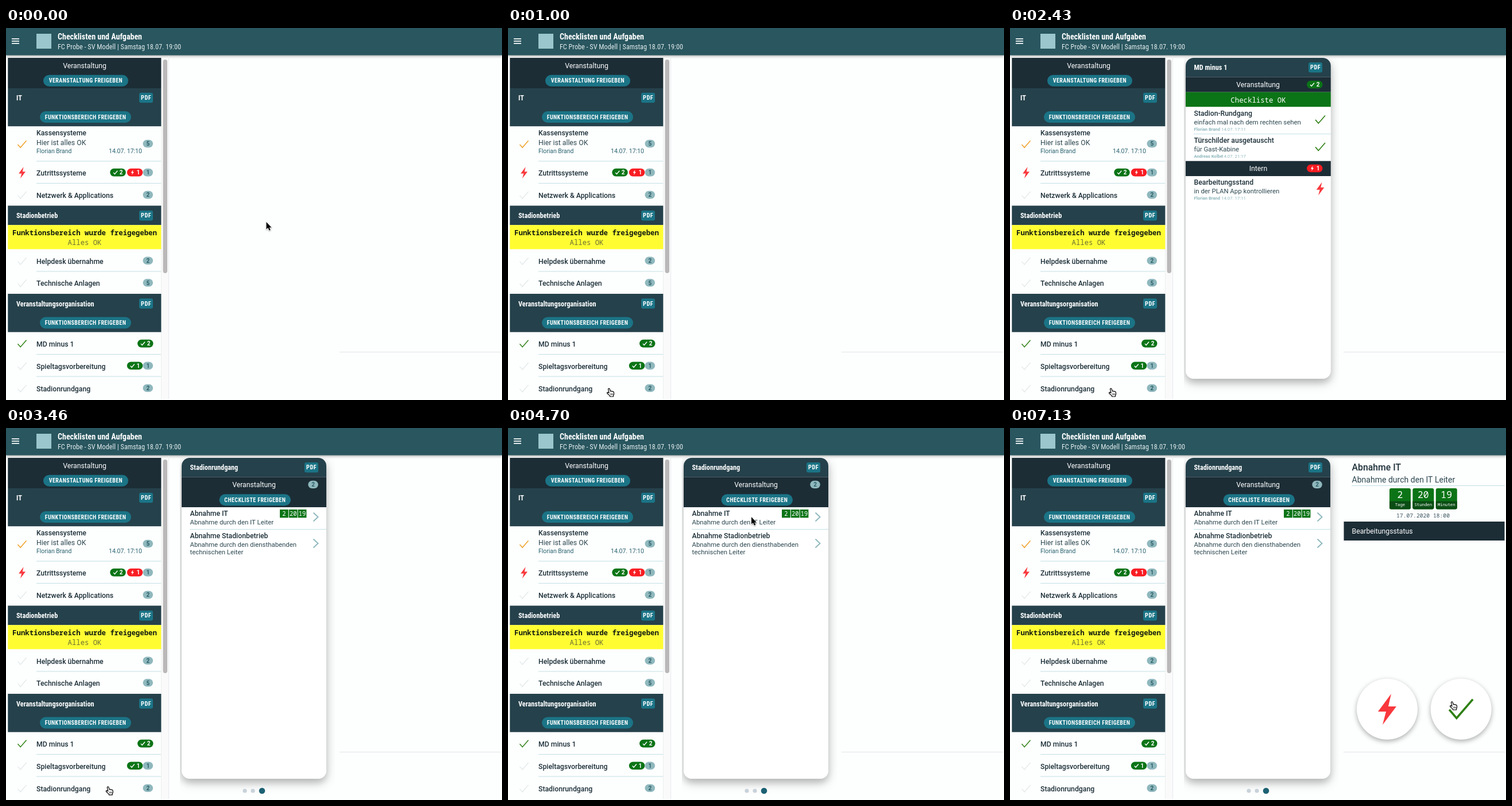
Recreate the animation shown at these times as an HTML page with a canvas. Size 864 by 648 pixels, loop 8000 ms.

```html
<!DOCTYPE html>
<html lang="de">
<head>
<meta charset="utf-8">
<title>Checklisten und Aufgaben</title>
<style>
html, body { margin: 0; width: 100%; height: 100%; overflow: hidden; background: #fdfefe; }
canvas { display: block; width: 864px; height: 648px; }
</style>
</head>
<body>
<canvas id="stage"></canvas>
<script>
const LOOP = 8000;
const canvas = document.getElementById('stage');
const dpr = window.devicePixelRatio || 1;
canvas.width = 864 * dpr;
canvas.height = 648 * dpr;
const ctx = canvas.getContext('2d');

const C = {
  bar: '#29565f', head: '#25414b', dark: '#1c2d36', teal: '#1b7486', mist: '#8fb8bd',
  green: '#0b7416', red: '#f81c22', bolt: '#f8383d', tick: '#2f8014', amber: '#f0a32c',
  faint: '#e2e9e9', line: '#c4e2e5', ink: '#1d3039', soft: '#2c4750', meta: '#28626e'
};
const SANS = 'Roboto, "Open Sans", sans-serif';
const COND = '"Roboto Condensed", Roboto, sans-serif';
const MONO = '"Roboto Mono", "Noto Sans Mono", "DejaVu Sans Mono", monospace';
const BODY = 12.25;

// Without a condensed face, tighter tracking takes its place.
function findTracking() {
  const sample = 'Checklisten und Aufgaben';
  ctx.font = `700 40px ${SANS}`;
  const plain = ctx.measureText(sample).width;
  ctx.fontStretch = 'condensed';
  ctx.font = `700 40px ${COND}`;
  const narrow = ctx.measureText(sample).width;
  ctx.fontStretch = 'normal';
  return narrow < plain * 0.95 ? 0 : -0.058;
}
const tracking = findTracking();

function text(str, x, y, o = {}) {
  const size = o.size || BODY;
  const family = o.family || SANS;
  const cond = family === COND;
  ctx.fontStretch = cond ? 'condensed' : 'normal';
  ctx.font = `${o.weight || 400} ${size}px ${family}`;
  ctx.letterSpacing = (o.space || 0) + (cond ? tracking * size : 0) + 'px';
  ctx.textAlign = o.align || 'left';
  ctx.fillStyle = o.color || C.ink;
  ctx.fillText(str, x, y);
}
const bold = (str, x, y, color = C.ink, size = BODY) => text(str, x, y, { weight: 500, color, size });
const heading = (str, x, y) => text(str, x, y, { family: COND, weight: 700, color: '#fff' });
const centered = (str, x, y, o) => text(str, x, y, { align: 'center', color: '#fff', ...o });

function rect(x, y, x2, y2, color) {
  ctx.fillStyle = color;
  ctx.fillRect(x, y, x2 - x, y2 - y);
}

function round(x, y, x2, y2, r, color) {
  ctx.fillStyle = color;
  ctx.beginPath();
  ctx.roundRect(x, y, x2 - x, y2 - y, r);
  ctx.fill();
}

function disc(x, y, r, color) {
  ctx.fillStyle = color;
  ctx.beginPath();
  ctx.arc(x, y, r, 0, Math.PI * 2);
  ctx.fill();
}

function stroke(points, color, width) {
  ctx.strokeStyle = color;
  ctx.lineWidth = width;
  ctx.beginPath();
  for (const [x, y] of points) ctx.lineTo(x, y);
  ctx.stroke();
}

function tick(x, y, w, color, width) {
  stroke([[x - w / 2, y + w * 0.04], [x - w * 0.19, y + w * 0.4], [x + w / 2, y - w * 0.4]], color, width);
}

function bolt(x, y, h, color) {
  const k = h / 54;
  ctx.fillStyle = color;
  ctx.beginPath();
  for (const [px, py] of [[7, -27], [-16, 4], [-2, 4], [-8, 27], [16, -5], [2, -5]]) ctx.lineTo(x + px * k, y + py * k);
  ctx.fill();
}

function shadow(color, blur, dy) {
  ctx.shadowColor = color;
  ctx.shadowBlur = blur * dpr;
  ctx.shadowOffsetY = dy * dpr;
}
const noShadow = () => shadow('transparent', 0, 0);

function button(label, x, y, x2) {
  round(x, y, x2, y + 20, 10, C.teal);
  centered(label, (x + x2) / 2, y + 13.5, { family: COND, weight: 700, size: 10, space: 0.4 });
}

function pdf(x, y) {
  round(x, y, x + 24, y + 17.5, 3, C.teal);
  centered('PDF', x + 12.2, y + 12.4, { family: COND, weight: 700, size: 10.4, space: 0.5 });
}

function count(n, y, x = 238.5) {
  round(x, y - 6.8, x + 17.5, y + 6.8, 6.8, C.mist);
  centered(n, x + 8.8, y + 3.7, { weight: 700, size: 10, color: '#2a5d68' });
}

function pill(n, x, y, ok) {
  round(x, y - 6.8, x + 27.5, y + 6.8, 6.8, ok ? C.green : C.red);
  if (ok) tick(x + 9.5, y, 7, '#fff', 1.4);
  else bolt(x + 9.5, y, 9, '#fff');
  centered(n, x + 19.5, y + 3.7, { weight: 700, size: 10 });
}

const hline = (y, x, x2, color = C.line) => rect(x, y - 0.5, x2, y + 0.5, color);

function topBar() {
  shadow('rgba(0,0,0,.35)', 5, 1);
  rect(0, 0, 864, 47.5, C.bar);
  noShadow();
  for (let i = 0; i < 3; i++) rect(10, 18 + i * 4, 23, 19.7 + i * 4, '#fff');
  rect(53, 10, 79, 36, '#9cc6cd');
  text('Checklisten und Aufgaben', 90, 19.5, { family: COND, weight: 700, size: 14, color: '#fff' });
  text('FC Probe - SV Modell | Samstag 18.07. 19:00', 90, 37, { family: COND, size: 12.2, color: '#e3edee' });
}

const band = (y, y2, color) => rect(3.3, y, 270.3, y2, color);

function sidebar() {
  rect(271, 52, 283, 646, '#fafafa');
  rect(283, 49, 284, 646, '#e9ebec');
  rect(270, 52, 271, 646, '#eceeee');
  round(273.5, 55, 281, 427, 3.7, '#bab8b8');

  band(52, 105, C.dark);
  centered('Veranstaltung', 137, 70);
  button('VERANSTALTUNG FREIGEBEN', 65, 81.7, 213);

  band(105, 171.2, C.head);
  heading('IT', 18, 126);
  pdf(232, 112.7);
  button('FUNKTIONSBEREICH FREIGEBEN', 59, 145, 218);

  tick(28, 202.3, 15, C.amber, 1.5);
  bold('Kassensysteme', 53, 187);
  text('Hier ist alles OK', 53, 204.3, { color: C.soft });
  text('Florian Brand', 53, 218.4, { size: 10.4, color: C.meta });
  text('14.07. 17:10', 179, 218.4, { size: 10.5, color: C.meta });
  count('5', 201.5);
  hline(232, 53, 270);

  bolt(28, 252, 20, C.bolt);
  bold('Zutrittssysteme', 53, 257);
  pill('2', 181.2, 251.6, true);
  pill('1', 210.8, 251.6, false);
  count('1', 251.6);
  hline(270.5, 53, 270);

  tick(28, 291, 15, C.faint, 1.2);
  bold('Netzwerk & Applications', 53, 296);
  count('2', 290.6);

  band(309.5, 343.2, C.head);
  heading('Stadionbetrieb', 18, 331);
  pdf(232, 318);
  band(343.2, 385.3, '#fffd32');
  centered('Funktionsbereich wurde freigegeben', 137, 361, { family: MONO, weight: 700, size: 12.35, color: '#111a10' });
  centered('Alles OK', 137, 378, { family: MONO, size: BODY, color: '#6b6f31' });

  tick(28, 406, 15, C.faint, 1.2);
  bold('Helpdesk übernahme', 53, 410.7);
  count('2', 405.2);
  hline(424, 53, 270);
  tick(28, 444.5, 15, C.faint, 1.2);
  bold('Technische Anlagen', 53, 449.3);
  count('5', 443.8);

  band(463, 529.7, C.head);
  heading('Veranstaltungsorganisation', 18, 484.5);
  pdf(232, 471.3);
  button('FUNKTIONSBEREICH FREIGEBEN', 59, 503.5, 218);

  tick(28, 549.7, 15, C.tick, 1.5);
  bold('MD minus 1', 53, 555);
  pill('2', 229, 549.6, true);
  hline(568.5, 53, 270);
  tick(28, 589, 15, C.faint, 1.2);
  bold('Spieltagsvorbereitung', 53, 594);
  pill('1', 210.8, 588.3, true);
  count('1', 588.3);
  hline(607, 53, 270);
  tick(28, 628, 15, C.faint, 1.2);
  bold('Stadionrundgang', 53, 632.7);
  count('2', 627.2);
}

function card(right, title) {
  ctx.save();
  ctx.beginPath();
  ctx.rect(303, 52, 270, 594);
  ctx.clip();
  shadow('rgba(0,0,0,.16)', 22, 6);
  round(306, 52, right, 611, 14, '#fff');
  shadow('rgba(0,0,0,.18)', 12, 7);
  round(306, 52, right, 611, 14, '#fff');
  ctx.restore();
  round(306, 52, right, 85.3, [14, 14, 0, 0], C.head);
  heading(title, 320.5, 73);
  pdf(520, 60);
}

function entry(title, sub, name, date, y) {
  bold(title, 320.5, y);
  text(sub, 320.5, y + 15.2, { size: 11.4, color: C.soft });
  text(name, 320.5, y + 26, { size: 7.6, weight: 700, color: C.mist });
  text(date, 368, y + 26, { size: 7.8, color: C.mist });
}

function matchdayCard() {
  const right = 558.8;
  card(right, 'MD minus 1');
  rect(306, 85.3, right, 111.7, C.dark);
  centered('Veranstaltung', 432, 103);
  pill('2', 517, 98.5, true);
  rect(306, 111.7, right, 137.3, C.green);
  centered('Checkliste OK', 432.5, 129.5, { family: MONO, size: 12.35 });
  entry('Stadion-Rundgang', 'einfach mal nach dem rechten sehen', 'Florian Brand', '14.07. 17:11', 152.5);
  tick(540.5, 159.2, 17, C.tick, 1.6);
  hline(184.5, 320, right);
  entry('Türschilder ausgetauscht', 'für Gast-Kabine', 'Andreas Kolbe', '14.07. 21:17', 200);
  tick(540.5, 206.7, 17, C.tick, 1.6);
  rect(306, 231.7, right, 258, C.dark);
  centered('Intern', 432.5, 249);
  pill('1', 517, 244.5, false);
  entry('Bearbeitungsstand', 'in der PLAN App kontrollieren', 'Florian Brand', '14.07. 17:11', 273);
  bolt(540.5, 280, 23, C.bolt);
}

function tourCard(t) {
  const right = 558;
  card(right, 'Stadionrundgang');
  rect(306, 85.3, right, 138, C.dark);
  centered('Veranstaltung', 432, 103);
  if (t >= 3000) count('2', 98.5, 526.3);
  button('CHECKLISTE FREIGEBEN', 371.5, 115.2, 496);

  bold('Abnahme IT', 320.5, 153.2);
  text('Abnahme durch den IT Leiter', 320.5, 168.2, { size: 11.4, color: C.soft });
  const left = t >= 3060 ? ['2', '20', '19'] : ['0', '0', '0'];
  left.forEach((n, i) => {
    const x = 477 + i * 15.8;
    rect(x, 142, x + 14.8, 156.3, C.green);
    centered(n, x + 7.4, 152.7, { family: MONO, size: 10.3 });
  });
  stroke([[535.5, 147.5], [543.5, 155], [535.5, 162.5]], C.mist, 1.9);
  hline(176.5, 320, right);

  bold('Abnahme Stadionbetrieb', 320.5, 191.7);
  text('Abnahme durch den diensthabenden', 320.5, 207, { size: 11.4, color: C.soft });
  text('technischen Leiter', 320.5, 220.2, { size: 11.4, color: C.soft });
  stroke([[535.5, 193.5], [543.5, 201], [535.5, 208.5]], C.mist, 1.9);

  disc(416, 632, 3.6, '#c8d2da');
  disc(430, 632, 3.6, '#c8d2da');
  disc(446, 632, 5.3, '#1c6173');
}

function roundButton(x) {
  shadow('rgba(0,0,0,.32)', 8, 3);
  disc(x, 489.7, 53, '#fff');
  noShadow();
}

function detail(t, hover) {
  bold('Abnahme IT', 595.5, 74, C.ink, 15.8);
  text('Abnahme durch den IT Leiter', 595.5, 95, { size: 14.05, color: C.soft });
  hline(100.5, 595, 862, '#bfe0e4');
  const left = t >= 6200 ? ['2', '20', '19'] : ['0', '0', '0'];
  ['Tage', 'Stunden', 'Minuten'].forEach((unit, i) => {
    const x = 661 + i * 40.4;
    round(x, 105, x + 37, 141.5, 3, C.green);
    round(x, 127.5, x + 37, 141.5, [0, 0, 3, 3], '#0a4d14');
    centered(left[i], x + 18.4, 122, { family: MONO, size: 16.4 });
    centered(unit, x + 18.4, 136.3, { family: MONO, size: 7.3 });
  });
  centered('17.07.2020 18:00', 719.5, 156, { family: MONO, size: 9.7, color: '#3a5560' });
  rect(581.5, 163, 861.5, 196, C.dark);
  text('Bearbeitungsstatus', 595.5, 184, { color: '#fff' });
  roundButton(657);
  bolt(657, 490, 54, C.bolt);
  roundButton(785.7);
  tick(785.7, 489, 41, C.tick, hover ? 3.7 : 3.1);
}

// Pointer stops: time, x, y
const stops = [
  [70, 453.5, 338], [330, 396.5, 380], [470, 396.5, 380], [800, 176, 628],
  [3430, 176, 628], [4060, 426, 206], [4170, 426, 206], [4430, 424, 155],
  [6370, 424, 155], [6500, 512.5, 191.5], [6630, 512.5, 191.5], [7130, 770, 477]
];

function pointer(t) {
  const i = stops.findIndex(s => s[0] > t);
  if (i === 0) return stops[0].slice(1);
  if (i < 0) return stops[stops.length - 1].slice(1);
  const [t0, x0, y0] = stops[i - 1];
  const [t1, x1, y1] = stops[i];
  const p = (t - t0) / (t1 - t0);
  const e = p * p * (3 - 2 * p);
  return [x0 + (x1 - x0) * e, y0 + (y1 - y0) * e];
}

const arrow = new Path2D('M0 0V12.6L3 10L5 14.8L7.2 13.8L5.2 9.4H9Z');
const hand = new Path2D('M2.5 2.2Q2.5.8 3.8.8Q5 .8 5.3 2.2L6.4 5.8Q7.5 5 8.5 6Q9.7 5.2 10.5 6.5Q12 6.1 12.3 7.5L12.6 10Q12.5 12 11.5 13.2V15H5.5V13.6L1 9.7Q0 8.1 1.3 7.6Q2.5 7.5 4 8.8Z');
const fingers = new Path2D('M6.8 9.5V12.3M8.6 9.5V12.3M10.4 9.5V12.3');

function drawPointer(x, y, isHand) {
  ctx.save();
  ctx.lineJoin = 'round';
  if (isHand) {
    ctx.translate(x - 4, y - 1);
    ctx.fillStyle = '#fff';
    ctx.strokeStyle = '#000';
    ctx.lineWidth = 1.2;
    ctx.fill(hand);
    ctx.stroke(hand);
    ctx.lineWidth = 0.8;
    ctx.stroke(fingers);
  } else {
    ctx.translate(x, y);
    shadow('rgba(0,0,0,.3)', 2, 1);
    ctx.strokeStyle = '#fff';
    ctx.lineWidth = 1.8;
    ctx.stroke(arrow);
    noShadow();
    ctx.fillStyle = '#000';
    ctx.fill(arrow);
  }
  ctx.restore();
}

function draw(t) {
  ctx.setTransform(dpr, 0, 0, dpr, 0, 0);
  rect(0, 0, 864, 648, '#fdfefe');
  const [x, y] = pointer(t);
  const hover = t > 6600 && Math.hypot(x - 785.7, y - 489.7) < 53;

  topBar();
  sidebar();
  hline(564.5, 581, 862, '#e2e6e7');

  if (t >= 2600) {
    tourCard(t);
  } else if (t >= 1930) {
    ctx.globalAlpha = t < 2060 ? 0.3 : t < 2430 ? 0.6 : 1;
    matchdayCard();
    ctx.globalAlpha = 1;
  }
  if (t >= 5200) {
    ctx.globalAlpha = t < 5260 ? 0.5 : 1;
    detail(t, hover);
    ctx.globalAlpha = 1;
  }
  drawPointer(x, y, hover || (x < 270 && y > 530));
}

const start = performance.now();
function frame() {
  draw((performance.now() - start) % LOOP);
  requestAnimationFrame(frame);
}
frame();
</script>
</body>
</html>
```
